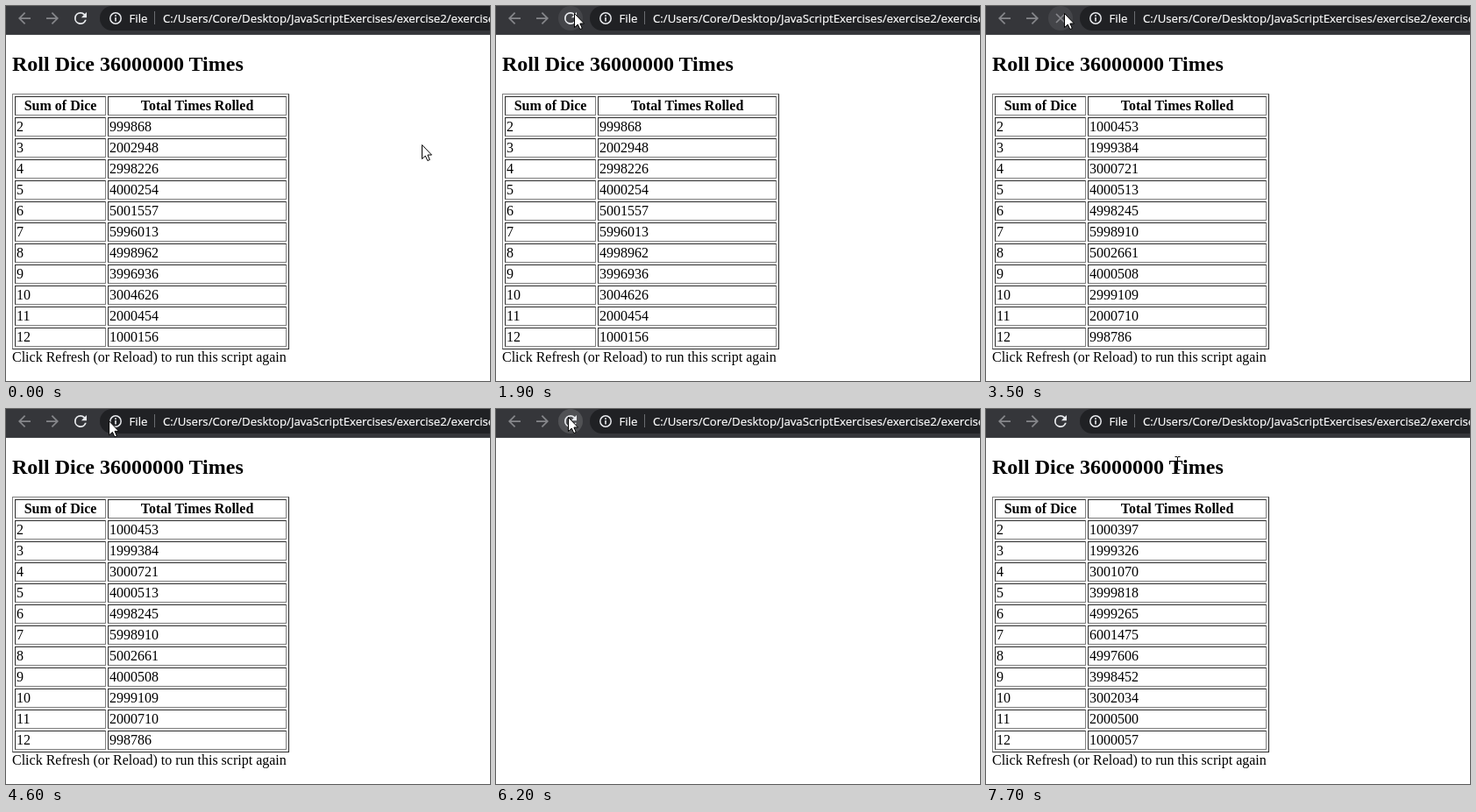
An HTML page that plays this animation: 552x428 px, repeating every 8 s.

```html
<!DOCTYPE html>
<html lang="en">
<head>
<meta charset="utf-8">
<title>Roll Dice</title>
<style>
  html, body { margin: 0; width: 100%; height: 100%; overflow: hidden; background: #fff; }
  #stage { position: relative; width: 552px; height: 428px; overflow: hidden; background: #fff; cursor: default; }
  #stage > *, #page > * { position: absolute; }
  #bar { left: 0; top: 0; }
  #bar text { font: 13.2px "Open Sans", "Noto Sans", sans-serif; fill: #fff; stroke: #fff; stroke-width: .2; }
  #page { left: 0; top: 0; color: #000; font: 16px/18px "Liberation Serif", "Times New Roman", serif; white-space: nowrap; }
  h2 { left: 7px; top: 53px; margin: 0; font-size: 24px; line-height: 27px; }
  table { left: 7px; top: 100px; width: 316px; table-layout: fixed; border-spacing: 2px; border-color: gray; }
  th, td { box-sizing: border-box; height: 22px; padding: 1px; border-color: gray; }
  th:first-child { width: 104px; }
  p { left: 7px; top: 392px; margin: 0; }
  #pointer { left: 0; top: 0; overflow: visible; }
</style>
</head>
<body>
<div id="stage">
  <div id="page">
    <h2>Roll Dice 36000000 Times</h2>
    <table border="1">
      <thead><tr><th>Sum of Dice</th><th>Total Times Rolled</th></tr></thead>
      <tbody id="rows"></tbody>
    </table>
    <p>Click Refresh (or Reload) to run this script again</p>
  </div>
  <svg id="bar" width="552" height="33">
    <rect width="552" height="33" fill="#35363a"/>
    <path d="M0 32.5h552" stroke="#45474b"/>
    <rect x="107" y="0" width="480" height="28" rx="14" fill="#202124"/>
    <g fill="#85868a">
      <path id="back" transform="translate(10.5 3.5) scale(.875)" d="M20 11H7.83l5.59-5.59L12 4l-8 8 8 8 1.41-1.41L7.83 13H20z"/>
      <use href="#back" transform="translate(74 0) scale(-1 1)"/>
    </g>
    <circle id="halo" cx="85" cy="14" r="14" fill="#fff"/>
    <path id="reload" transform="translate(74.5 3.5) scale(.875)" fill="#e8eaed" d="M17.65 6.35A7.95 7.95 0 0 0 12 4a8 8 0 1 0 7.73 10h-2.08A6 6 0 1 1 12 6c1.66 0 3.14.69 4.22 1.78L13 11h7V4z"/>
    <path id="stop" d="M80 9l10 10M90 9l-10 10" fill="none" stroke-width="1.7"/>
    <circle cx="125" cy="14" r="6.2" fill="none" stroke="#e8eaed" stroke-width="1.5"/>
    <path d="M125 10.3v1.6M125 13v4.6" stroke="#e8eaed" stroke-width="1.6"/>
    <text x="140.5" y="19">File</text>
    <path d="M169.5 6v15" stroke="#6b6d71"/>
    <text x="179" y="19">C:/Users/Core/Desktop/JavaScriptExercises/exercise2/exercise2.html</text>
  </svg>
  <svg id="pointer" width="20" height="20">
    <path id="arrow" d="M.5 .5V16.5L4.3 13.1 6.8 18.5 9.3 17.5 6.9 12H11.5Z" fill="#fff" stroke="#000"/>
    <path id="beam" d="M-3 -7.5h2.5l.5 .5 .5 -.5H3M0 -7V7M-3 7.5h2.5l.5 -.5 .5 .5H3" fill="none" stroke="#000"/>
  </svg>
</div>
<script>
const LOOP = 8000;
const STEP = 100;
const get = id => document.getElementById(id);
const show = (id, visible) => get(id).style.display = visible ? '' : 'none';

// The page clears at `blank` and comes back with new totals at `ready`.
const loads = [
  { blank: -LOOP, ready: -LOOP, totals: '999868 2002948 2998226 4000254 5001557 5996013 4998962 3996936 3004626 2000454 1000156' },
  { blank: 2000, ready: 3500, totals: '1000453 1999384 3000721 4000513 4998245 5998910 5002661 4000508 2999109 2000710 998786' },
  { blank: 6200, ready: 7600, totals: '1000397 1999326 3001070 3999818 4999265 6001475 4997606 3998452 3002034 2000500 1000057' }
];

// Key points of the pointer: time, x, y.
const stops = [
  [600, 474, 158], [1500, 89, 8],
  [4500, 89, 8], [4900, 269, 42], [5200, 87, 3], [5500, 82, 9],
  [6800, 82, 9], [7200, 432, 61], [7400, 218.5, 62]
];

const smooth = u => u * u * (3 - 2 * u);

function pointerAt(time) {
  const next = stops.findIndex(stop => stop[0] > time);
  if (next === 0) return stops[0].slice(1);
  if (next < 0) return stops[stops.length - 1].slice(1);
  const [t0, x0, y0] = stops[next - 1];
  const [t1, x1, y1] = stops[next];
  const k = smooth((time - t0) / (t1 - t0));
  return [x0 + (x1 - x0) * k, y0 + (y1 - y0) * k];
}

const cells = loads[0].totals.split(' ').map((_, i) => {
  const row = get('rows').insertRow();
  row.insertCell().textContent = i + 2;
  return row.insertCell();
});

let shownLoad;

function draw(time) {
  const load = loads.findLast(({ blank }) => time >= blank);
  const sinceBlank = time - load.blank;
  const sinceReady = time - load.ready;
  const loaded = sinceReady >= 0;
  show('page', loaded);
  if (loaded && load !== shownLoad) {
    load.totals.split(' ').forEach((total, i) => cells[i].textContent = total);
    shownLoad = load;
  }

  const [x, y] = pointerAt(time);
  const hover = Math.hypot(x - 85, y - 14) < 13;
  const overText = loaded && x < 270 && y > 54 && y < 78;
  show('arrow', !overText);
  show('beam', overText);
  get('pointer').style.transform = `translate(${x}px, ${y}px)`;

  // A hovered button stays dimmed for a moment after loading.
  const dim = loaded && hover && sinceReady < 300;
  const stopping = dim || (!loaded && sinceBlank >= 200);
  show('reload', !stopping);
  show('stop', stopping);
  get('stop').setAttribute('stroke', dim ? '#85868a' : '#e8eaed');

  const ripple = Math.max(0, 1 - sinceBlank / 500);
  get('halo').setAttribute('opacity', hover ? .08 + .06 * ripple : 0);
}

const begin = performance.now();
function tick() {
  const time = (performance.now() - begin) % LOOP;
  draw(Math.floor(time / STEP) * STEP);
  requestAnimationFrame(tick);
}
tick();
</script>
</body>
</html>
```
